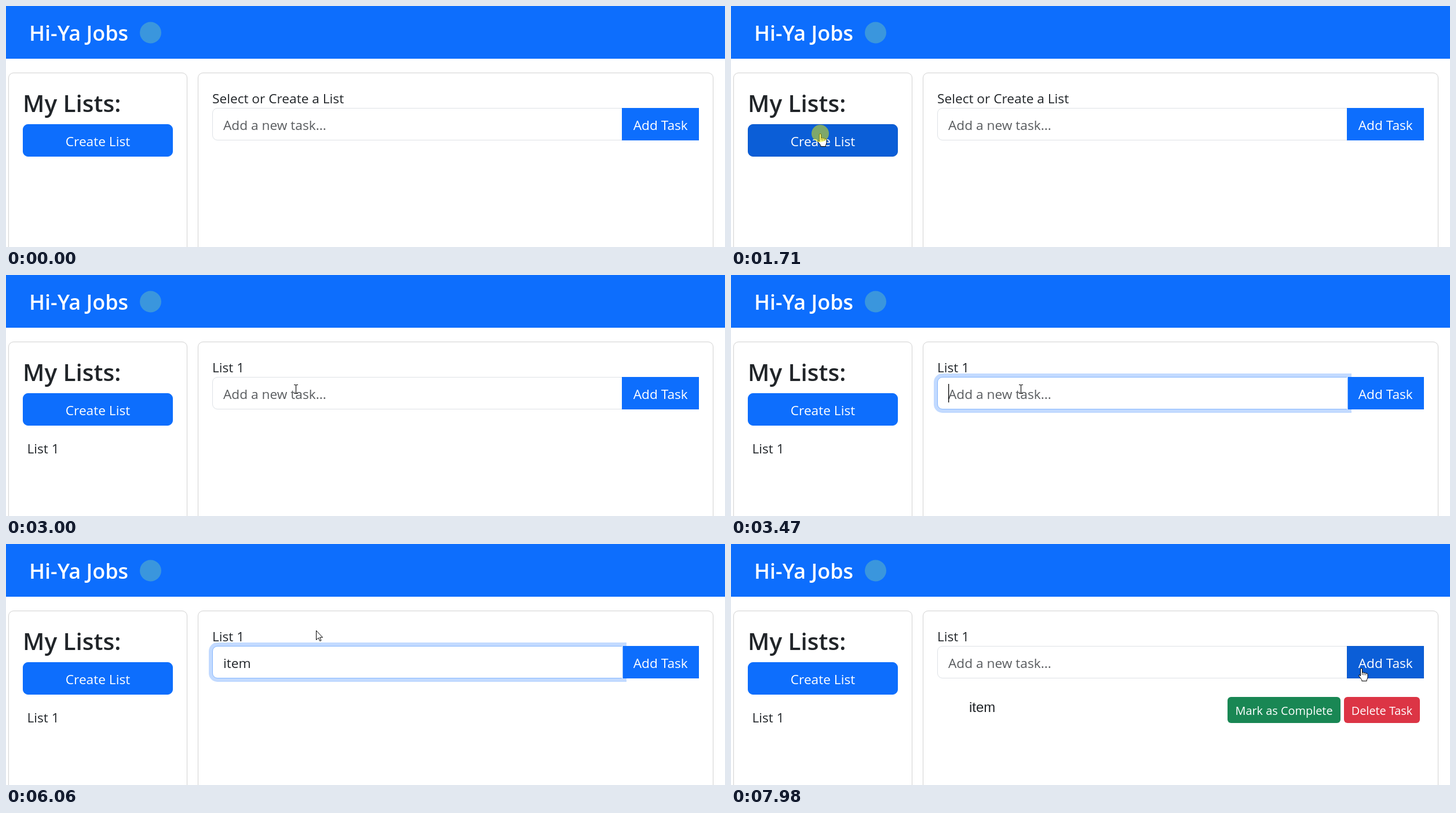
An HTML page for the animation above (8 s loop, 1241 px wide and 416 px high).

```html
<!DOCTYPE html>
<html lang="en">
<head>
<meta charset="utf-8">
<title>Task list demo</title>
<style>
  html, body { margin: 0; width: 100%; height: 100%; overflow: hidden; background: #fff; }
  svg { display: block; width: 1241px; height: 416px; }
  text { font: 22.7px "Open Sans", "Noto Sans", sans-serif; fill: #212529; white-space: pre; }
  .light { fill: #fff; }
  .mid { text-anchor: middle; }
  .small { font-size: 19.9px; }
  .brand { font-size: 36px; font-weight: 600; }
  .heading { font-size: 40.5px; font-weight: 600; }
  .task { font-family: "Liberation Sans", Arial, sans-serif; font-size: 24px; }
  .panel { fill: #fff; stroke: #d2d2d2; }
  .pointer { fill: #fff; stroke: #000; stroke-linejoin: round; }
</style>
</head>
<body>
<svg viewBox="0 0 1241 416">
  <rect width="1241" height="416" fill="#fff"/>
  <rect width="1241" height="91" fill="#0d6efd"/>
  <text class="brand light" x="40" y="60">Hi-Ya Jobs</text>
  <circle cx="249.5" cy="46" r="18.5" fill="#3a96dd"/>

  <rect class="panel" x="4.5" y="115.5" width="308" height="330" rx="8.5"/>
  <rect class="panel" x="331.5" y="115.5" width="889" height="330" rx="8.5"/>
  <text class="heading" x="29" y="183">My Lists:</text>
  <rect id="create" x="29.5" y="204.5" width="258" height="55" rx="8.5"/>
  <text class="light mid" x="158.5" y="242">Create List</text>
  <text id="listItem" x="36.5" y="308">List 1</text>

  <text id="listTitle" x="356" y="168"></text>
  <path id="ring" d="M1071 170H365a15 15 0 0 0-15 15V223a15 15 0 0 0 15 15H1071Z" fill="#0d6efd"/>
  <path id="field" d="M1064.5 176.5H365a8.5 8.5 0 0 0-8.5 8.5V223a8.5 8.5 0 0 0 8.5 8.5H1064.5Z" fill="#fff"/>
  <text id="entry" x="375" y="214"></text>
  <rect id="caret" y="188" width="1.3" height="32" fill="#000"/>
  <rect id="add" x="1063.5" y="176.5" width="132" height="55"/>
  <g id="overlap">
    <rect x="1063" y="176" width="1" height="56" fill="#fff"/>
    <rect x="1064" y="176" width="1" height="56" fill="#86b7fe"/>
    <rect x="1065" y="176" width="6" height="56" fill="#0d6efd" opacity=".25"/>
  </g>
  <text class="light mid" x="1129.7" y="214">Add Task</text>

  <g id="taskRow">
    <text class="task" x="411" y="290">item</text>
    <rect x="857" y="264" width="195" height="45" rx="6" fill="#198754"/>
    <text class="light small mid" x="954.5" y="295">Mark as Complete</text>
    <rect x="1058" y="264" width="131" height="45" rx="6" fill="#dc3545"/>
    <text class="light small mid" x="1123.5" y="295">Delete Task</text>
  </g>

  <g id="cursor">
    <path id="arrow" class="pointer" d="M.5 .5V16.500L4.200 13 6.800 18.500 9 17.500 6.500 12.200H11.500Z"/>
    <path id="beam" d="M-3-7.500H-1Q.5-7.500.5-6Q.5-7.500 2-7.500H4M.5-6V6M-3 7.500H-1Q.5 7.500.5 6Q.5 7.500 2 7.500H4" fill="none" stroke="#111" stroke-width="1.2"/>
    <g id="hand" class="pointer">
      <path d="M-1.500 14V2Q-1.500.5 0 .5T1.600 2V8Q3 6.600 4.500 8.300Q6.500 7.200 7.700 9.200Q10.500 8.300 11 11V15.500Q11 18 9.300 20.500V22.500H.8V20.500L-4.200 14Q-5 11.500-2.800 11.700Z"/>
      <path d="M1.600 8V12M4.600 8.500V12.500M7.700 9.200V12.500" fill="none" stroke-width=".9"/>
    </g>
  </g>
  <circle id="click" r="15" fill="#f2f200" opacity=".5"/>
</svg>
<script>
const LOOP = 8000;
const BLINK = 530;
const FADE = 150;
const FILLS = [[13, 110, 253], [11, 94, 215], [10, 88, 202]];
const EDGES = [[13, 110, 253], [10, 88, 202], [10, 83, 190]];
const BORDER = [222, 226, 230], FOCUS_BORDER = [134, 183, 254];

const el = {};
document.querySelectorAll("[id]").forEach(node => el[node.id] = node);

// Pointer moves: first and last step time, step count, target, upward arc
const START = [1112, 402];
const moves = [
  { from: 190, to: 960, steps: 12, x: 164, y: 214, arc: 0 },
  { from: 1030, to: 1030, steps: 1, x: 154, y: 220, arc: 0 },
  { from: 2380, to: 3000, steps: 9, x: 500, y: 197, arc: 14 },
  { from: 3670, to: 3670, steps: 1, x: 500, y: 199, arc: 0 },
  { from: 5920, to: 6060, steps: 3, x: 535, y: 149, arc: 0 },
  { from: 6260, to: 7100, steps: 13, x: 1094, y: 213, arc: 0 },
  { from: 7780, to: 7780, steps: 1, x: 1092, y: 213, arc: 0 },
  { from: 7980, to: 7980, steps: 1, x: 1088, y: 214, arc: 0 }
];
const keystrokes = [4730, 4860, 5060, 5260];
const clicks = [[1710, 1890], [3330, 3470], [7300, 7440]];

const clamp = v => Math.min(1, Math.max(0, v));
const within = (t, a, b) => t >= a && t < b;
const ease = p => p < .5 ? 4 * p ** 3 : 1 - (2 - 2 * p) ** 3 / 2;
const fade = (t, at) => { const p = clamp((t - at) / FADE); return p * p * (3 - 2 * p); };
const pulse = (t, on, off) => fade(t, on) - fade(t, off);
const mix = (a, b, p) => a.map((v, i) => v + (b[i] - v) * p);
const rgb = c => `rgb(${c.map(Math.round)})`;
const show = (node, on) => node.setAttribute("visibility", on ? "inherit" : "hidden");

function paintButton(node, hover, press) {
  const shade = ([normal, over, down]) => rgb(mix(mix(normal, over, hover), down, press));
  node.setAttribute("fill", shade(FILLS));
  node.setAttribute("stroke", shade(EDGES));
}

function pointerAt(t) {
  let [x, y] = START;
  for (const m of moves) {
    if (t < m.from) break;
    const span = (m.to - m.from) / (m.steps - 1 || 1) || 1;
    const step = Math.min(m.steps, Math.floor((t - m.from) / span + 1e-6) + 1);
    const p = ease(step / m.steps);
    x += (m.x - x) * p;
    y += (m.y - y) * p - m.arc * Math.sin(Math.PI * p);
  }
  return [x, y];
}

function pointerShape(x, y) {
  const overCreate = within(x, 29, 288) && within(y, 204, 260);
  const overRow = within(y, 176, 232);
  if (overCreate || overRow && within(x, 1063, 1196)) return "hand";
  return overRow && within(x, 356, 1063) ? "beam" : "arrow";
}

function drawPointer(t) {
  const [x, y] = pointerAt(t).map(Math.round);
  const shape = pointerShape(x, y);
  el.cursor.setAttribute("transform", `translate(${x} ${y})`);
  show(el.cursor, t >= 190 && !within(t, 4730, 5920));
  for (const name of ["arrow", "beam", "hand"]) show(el[name], name === shape);
  el.click.setAttribute("cx", x);
  el.click.setAttribute("cy", y);
  show(el.click, clicks.some(([a, b]) => within(t, a, b)));
}

function drawField(t) {
  const added = t >= 7440;
  const typed = added ? 0 : keystrokes.filter(k => t >= k).length;
  const focused = within(t, 3330, 7300);
  const glow = pulse(t, 3310, 7310);

  el.entry.textContent = typed ? "item".slice(0, typed) : "Add a new task...";
  el.entry.style.fill = typed ? "#212529" : "#595c5f";
  el.ring.setAttribute("opacity", .25 * glow);
  el.field.setAttribute("stroke", rgb(mix(BORDER, FOCUS_BORDER, glow)));
  show(el.overlap, focused);
  show(el.taskRow, added);

  const lastInput = typed ? keystrokes[typed - 1] : 3340;
  show(el.caret, focused && t >= lastInput && Math.floor((t - lastInput) / BLINK) % 2 === 0);
  el.caret.setAttribute("x", 375 + (typed ? Math.round(el.entry.getComputedTextLength()) : 0));
}

function draw(t) {
  const listed = t >= 1890;
  show(el.listItem, listed);
  el.listTitle.textContent = listed ? "List 1" : "Select or Create a List";
  paintButton(el.create, pulse(t, 750, 2690), pulse(t, 1710, 1880));
  paintButton(el.add, fade(t, 6900), pulse(t, 7300, 7430));
  drawField(t);
  drawPointer(t);
}

const start = performance.now();
function tick() {
  draw((performance.now() - start) % LOOP);
  requestAnimationFrame(tick);
}
tick();
</script>
</body>
</html>
```
